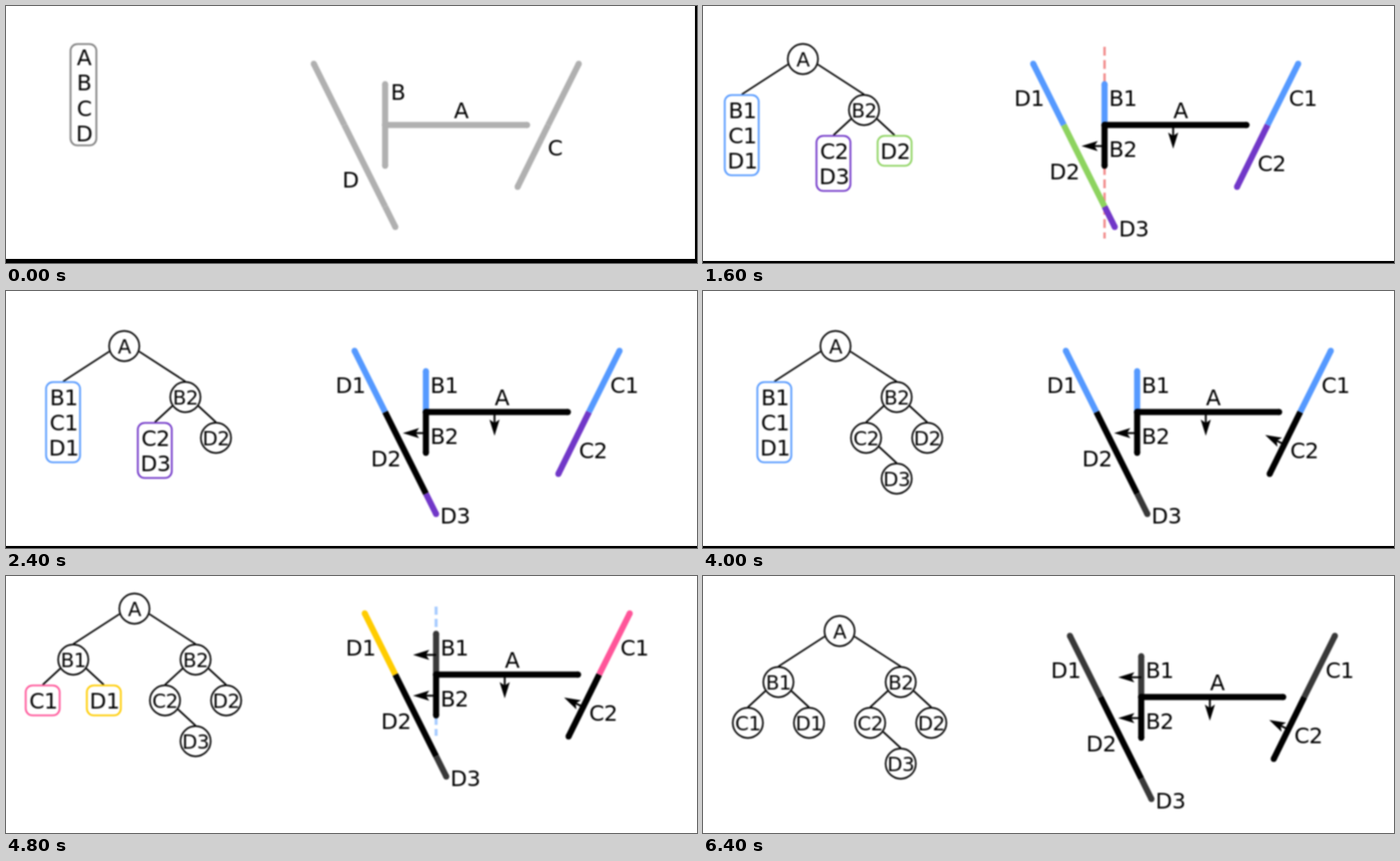
These frames come from a looping animation (1017x378 px, 7.2 s). An HTML page:

```html
<!DOCTYPE html>
<html lang="en">
<head>
<meta charset="utf-8">
<title>Building a BSP tree</title>
<style>
  html, body { margin: 0; width: 100%; height: 100%; overflow: hidden; background: #fff; }
  svg { display: block; width: 1017px; height: 378px; }
  #scene { filter: blur(.95px); }
  text { font: 32px "DejaVu Sans", sans-serif; letter-spacing: -.6px; text-anchor: middle; fill: #000; }
  .node { font-size: 29px; }
</style>
</head>
<body>
<svg viewBox="0 0 1017 378"><g id="scene"></g><g id="border"></g></svg>
<script>
const STEP_MS = 800;
const GRAY = '#b0b0b0', BLUE = '#5599ff', PURPLE = '#7137c8';

// Position of the root node in each step
const origins = [[114, 78], [195, 105], [147, 78], [174, 81], [153, 96],
                 [195, 81], [189, 48], [210, 60], [201, 81]];

// Step n shows the first n of these as tree nodes
const order = ['A', 'B2', 'D2', 'C2', 'D3', 'B1', 'D1', 'C1'];

const spots = {
  A: [0, 0], B1: [-90, 75], B2: [90, 75], C1: [-135, 135],
  D1: [-45, 135], C2: [45, 135], D2: [135, 135], D3: [90, 195]
};
const parents = { B1: 'A', B2: 'A', C1: 'B1', D1: 'B1', C2: 'B2', D2: 'B2', D3: 'C2' };

// Pending lists: colour, members, first and last step
const groups = [
  [BLUE, ['B1', 'C1', 'D1'], 1, 5],
  ['#ff5555', ['B2', 'C2', 'D2'], 1, 1],
  [PURPLE, ['C2', 'D3'], 2, 3],
  ['#8dd35f', ['D2'], 2, 2],
  ['#ff6600', ['D3'], 4, 4],
  ['#ff5599', ['C1'], 6, 7],
  ['#ffcc00', ['D1'], 6, 6]
];

// Walls: x1, y1, x2, y2, then which ends are free (1 start, 2 end, 3 both)
const walls = {
  B1: [444, 37, 444, 97, 1], C1: [729, 7, 684, 97, 1],
  D1: [339, 7, 384, 97, 1], D3: [444, 217, 459, 247, 2],
  D2: [384, 97, 444, 217, 0], C2: [684, 97, 639, 188, 2],
  B2: [444, 97, 444, 157, 3], A: [444, 97, 653, 97, 3]
};
const labels = {
  A: [556, 87], B1: [471, 69], B2: [471, 144], C1: [736, 69],
  C2: [690, 165], D1: [333, 69], D2: [385, 177], D3: [487, 261]
};
const firstLabels = { A: [556, 87], B: [463, 60], C: [694, 142], D: [393, 189] };

// Arrows: x, y, angle, length
const arrows = {
  A: [545, 97, 90, 35], B2: [444, 128, 180, 34],
  B1: [444, 68, 180, 34], C2: [661, 145, 206.5, 32]
};

// Splitting lines: points, colour, width, pattern
const splits = {
  1: [340, 97, 735, 97, '#b8b8b8', 3.5, '12 7'],
  2: [444, -18, 444, 264, '#f28b8b', 3.5, '13 6.5'],
  4: [758, -51, 609, 250, '#8a55dc', 2.6, '8 4.5'],
  6: [444, -3, 444, 187, '#a8ccff', 4.5, '12 6']
};

const text = (s, x, y, cls = '') => `<text class="${cls}" x="${x}" y="${y}">${s}</text>`;

const line = (x1, y1, x2, y2, color, width, extra = '') =>
  `<path d="M${x1} ${y1}L${x2} ${y2}" stroke="${color}" stroke-width="${width}" ${extra}/>`;

const rect = (x, y, w, h, attrs) =>
  `<rect x="${x}" y="${y}" width="${w}" height="${h}" ${attrs}/>`;

function wall([x1, y1, x2, y2, free], color) {
  const cap = (x, y) => `<circle cx="${x}" cy="${y}" r="4.5" fill="${color}"/>`;
  return line(x1, y1, x2, y2, color, 9) +
    (free & 1 ? cap(x1, y1) : '') + (free & 2 ? cap(x2, y2) : '');
}

function arrow([x, y, angle, len]) {
  return `<g transform="translate(${x} ${y}) rotate(${angle})">` +
    line(0, 0, len - 18, 0, '#000', 2.8) +
    `<path d="M${len} 0L${len - 24} 7.5L${len - 19} 0L${len - 24} -7.5Z"/></g>`;
}

function node(name) {
  const [x, y] = spots[name];
  return `<circle cx="${x}" cy="${y}" r="22.2" fill="none" stroke="#000" stroke-width="2.4"/>` +
    text(name, x, y + 10.5, 'node');
}

function listBox(names, [x, y], w, h, color, baseline) {
  return rect(x - w / 2, y - 22, w, h, `rx="10" fill="none" stroke="${color}" stroke-width="2.6"`) +
    names.map((n, i) => text(n, x + 1, y - 23 + baseline + 37.3 * i)).join('');
}

function edge(child) {
  const parent = parents[child];
  if (!parent) return '';
  const [px, py] = spots[parent], [cx, cy] = spots[child];
  const [dx, dy] = parent === 'A' ? [22, 8] : [19, 13];
  return line(px + Math.sign(cx - px) * dx, py + dy, cx, cy - 23, '#000', 2.4);
}

const labelAll = map => Object.entries(map).map(([n, p]) => text(n, ...p)).join('');

function drawStart() {
  return listBox(['A', 'B', 'C', 'D'], [0, 0], 38, 149, '#808080', 32) +
    Object.values(walls).map(w => wall(w, GRAY)).join('') + labelAll(firstLabels);
}

function drawStep(step) {
  const nodes = order.slice(0, step);
  const pending = groups.filter(([, , from, to]) => step >= from && step <= to);
  const heads = pending.map(g => g[1][0]);

  const colorOf = name => {
    if (nodes.includes(name)) return /1|3/.test(name) ? '#383838' : '#000';
    const key = step === 1 && name === 'D3' ? 'D2' : name;
    return pending.find(g => g[1].includes(key))[0];
  };

  const shown = { ...labels };
  if (step === 1) delete shown.D3;

  return [...nodes, ...heads].map(edge).join('') +
    nodes.map(node).join('') +
    pending.map(([color, names]) =>
      listBox(names, spots[names[0]], 50, 7 + 37 * names.length, color, 34.5)).join('') +
    (splits[step] ? line(...splits[step].slice(0, 6), `stroke-dasharray="${splits[step][6]}"`) : '') +
    Object.entries(walls).map(([n, w]) => wall(w, colorOf(n))).join('') +
    nodes.filter(n => arrows[n]).map(n => arrow(arrows[n])).join('') +
    labelAll(shown);
}

function drawBorder(step) {
  if (step === 0) return rect(0, 372, 1017, 6, '') + rect(1014, 0, 3, 378, '');
  return step < 6 ? rect(0, 375, 1017, 3, '') : '';
}

const scene = document.getElementById('scene');
const border = document.getElementById('border');
let current = -1;

function render(time) {
  const step = Math.floor(time / STEP_MS) % origins.length;
  if (step === current) return;
  current = step;
  scene.innerHTML = `<g transform="translate(${origins[step]})">` +
    (step ? drawStep(step) : drawStart()) + '</g>';
  border.innerHTML = drawBorder(step);
}

const start = performance.now();
function tick() {
  render(performance.now() - start);
  requestAnimationFrame(tick);
}
tick();
</script>
</body>
</html>
```
